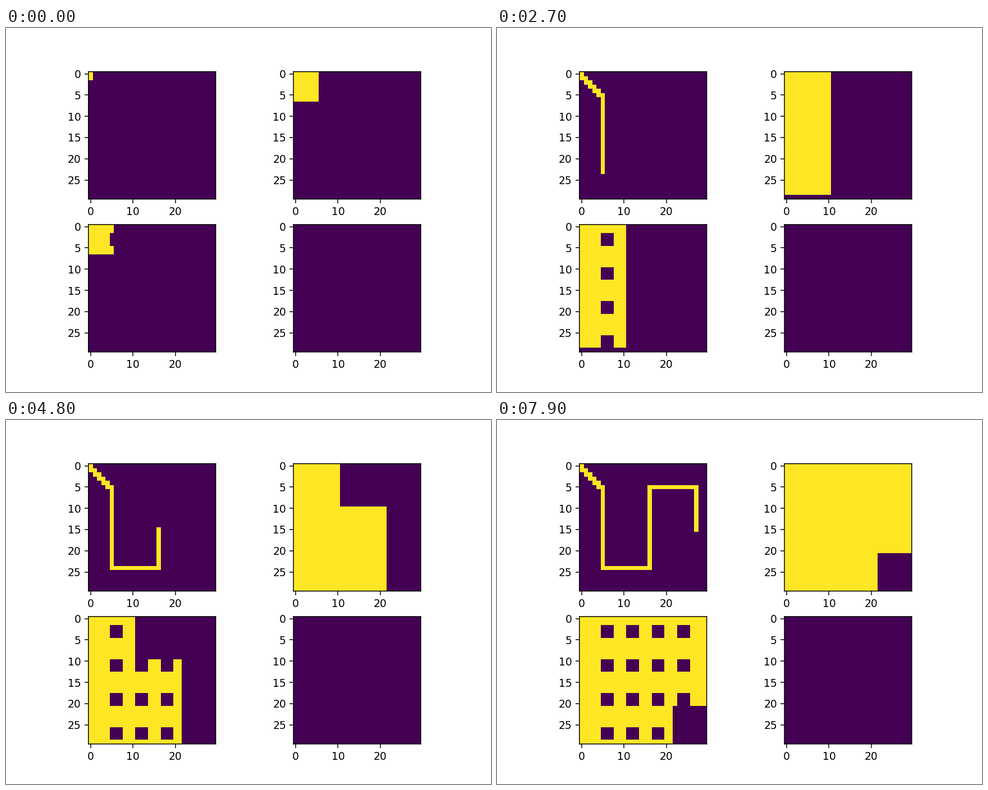
A matplotlib script that plays this animation: 864x648 px, repeating every 8000 ms.

```python
import numpy as np
import matplotlib.pyplot as plt
from matplotlib.animation import FuncAnimation

SIZE = 30
REACH = 5
FRAMES = 80


def build_path():
    """Staircase to (5, 5), then a boustrophedon sweep, one cell per step."""
    path = [(0, 0)]
    for i in range(5):
        path += [(i + 1, i), (i + 1, i + 1)]
    for row, col in [(24, 5), (24, 16), (5, 16), (5, 27), (24, 27)]:
        while path[-1] != (row, col):
            r, c = path[-1]
            path.append((r + int(np.sign(row - r)), c + int(np.sign(col - c))))
    return path


def build_obstacles():
    """A 4 x 4 arrangement of square blocks, three cells wide."""
    blocked = np.zeros((SIZE, SIZE), bool)
    for i in range(4):
        for j in range(4):
            r, c = 2 + 8 * i, 5 + 6 * j
            blocked[r:r + 3, c:c + 3] = True
    return blocked


PATH = build_path()
OBSTACLES = build_obstacles()

plt.rcParams["path.snap"] = False  # keep axes borders at sub-pixel positions
fig, axes = plt.subplots(2, 2, figsize=(6.4, 4.8), dpi=135)
blank = np.zeros((SIZE, SIZE))
images = [ax.imshow(blank, cmap="viridis", vmin=0, vmax=1) for ax in axes.flat]
for ax in axes.flat:
    ax.set_xticks(range(0, SIZE, 10))
    ax.set_yticks(range(0, SIZE, 5))


def update(frame):
    trail, seen = np.zeros((2, SIZE, SIZE))
    for r, c in PATH[:frame + 2]:
        trail[r, c] = 1
        seen[max(r - REACH, 0):r + REACH + 1, max(c - REACH, 0):c + REACH + 1] = 1
    for image, grid in zip(images, (trail, seen, seen * ~OBSTACLES)):
        image.set_data(grid)
    return images


anim = FuncAnimation(fig, update, frames=FRAMES, interval=100, repeat=True)
plt.show()
```
